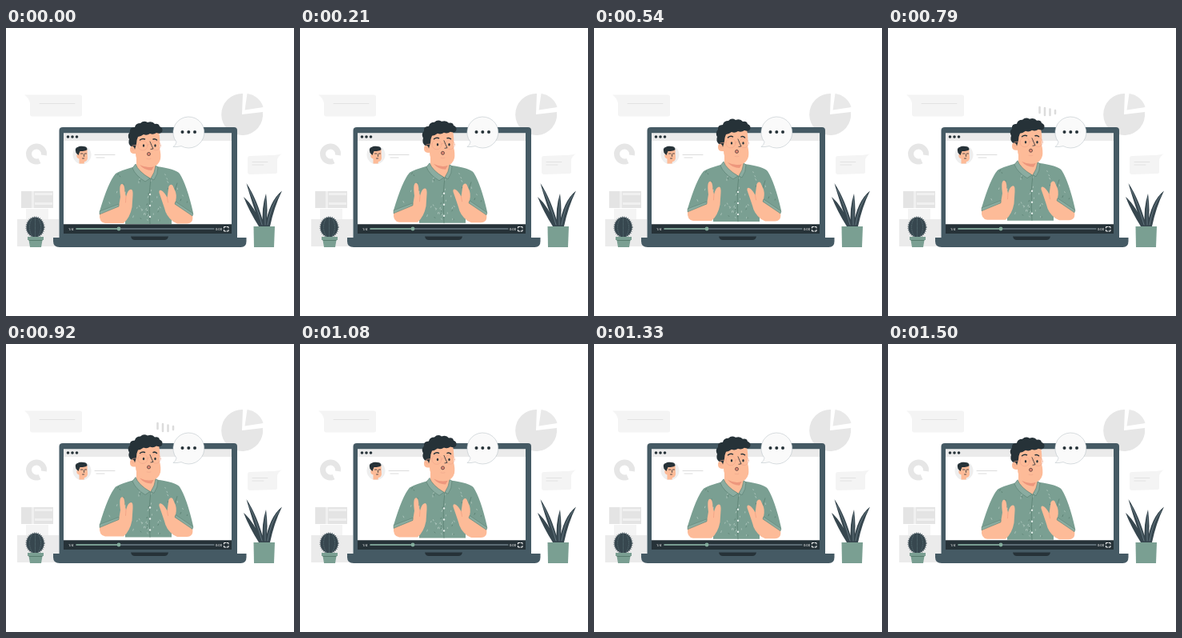
Animation, 360 px wide and 360 px high, one loop 1.54 s. Source, as an HTML page:

```html
<!DOCTYPE html>
<html lang="en">
<head>
<meta charset="utf-8">
<style>
  html, body { margin: 0; width: 100%; height: 100%; overflow: hidden; background: #fff; }
  svg { display: block; width: 100vw; height: 100vh; }
  text { font: 4.2px Roboto, sans-serif; fill: #fff; }
  .dark { fill: #263238; }
  .slate { fill: #455a64; }
  .green { fill: #7a9f92; }
  .skin { fill: #fdbb98; }
  .line { fill: none; stroke-linecap: round; stroke-linejoin: round; }
</style>
</head>
<body>
<svg viewBox="0 0 360 360">
  <!-- background items -->
  <g fill="#f4f4f4">
    <path d="M23 83.500H92.500q2.500 0 2.500 2.500v22q0 2.500-2.500 2.500H33q-3 0-3-3V94Q29 88 23 83.500z"/>
    <path d="M345 157q-6 4-6 9v14q0 2-2 2l-32 1q-3 0-3-3v-17q0-3 3-3l25-1q10 0 15-2z"/>
    <path d="M25 226h28v13H25z"/>
  </g>
  <path class="line" stroke="#e2e2e2" d="M42 94.500H86M308 167.500h19M308 171h14"/>
  <path fill="#e6e6e6" d="M295 108l1-26a26 26 0 1 0 25 23z"/>
  <path fill="#e9e9e9" d="M298.500 102.500l3-20.500a24 24 0 0 1 20 17z"/>
  <path class="line" style="stroke-linecap:butt" stroke="#e6e6e6" stroke-width="7" d="M42 166.100A9.500 9.500 0 1 1 47.400 159"/>
  <path fill="#e4e4e4" d="M19 204h40v21H19z"/>
  <path fill="#f0f0f0" d="M32 204h3v21h-3zM36 206h22v3H36zM36 218h22v3H36z"/>
  <path fill="#ebebeb" d="M14 239h52v34H14z"/>
  <path id="bars" class="line" stroke="#dcdcdc" stroke-width="2.500" d="M189.500 99v7M196 100v9M202.500 101.500v7.500M209 103v4"/>

  <!-- laptop -->
  <path class="slate" d="M71 124H285q4 0 4 4V263H66.500V128q0-4 4.500-4z"/>
  <path fill="#fff" d="M72 131.500H282V257H72z"/>
  <path fill="#ebebeb" d="M72 131.500H282V141H72z"/>
  <g class="dark"><circle cx="77.500" cy="136" r="1.800"/><circle cx="83" cy="136" r="1.800"/><circle cx="88.500" cy="136" r="1.800"/></g>
  <circle cx="95" cy="158.500" r="11.500" fill="#eeeeee"/>
  <path class="skin" d="M89.500 152H101.500l.5 11q-1 4-4 4l-.5 2.500h-6v-6q-4-1-3-5z"/>
  <path class="dark" d="M87.500 156q-2-6 2-7 3-2 7-1 5 0 5 4-2 2-9 2l-2 5z"/>
  <path class="line" stroke="#263238" stroke-width=".8" d="M93.500 157h2.500M98.500 157h2M97.500 158v2.500M95.500 163h2"/>
  <path class="line" stroke="#dcdcdc" d="M111 158.500h25M113 162h10"/>
  <path class="dark" d="M72 245.200H282V257H72z"/>
  <path class="line" stroke="#90a4ae" stroke-width="1.200" d="M88 251H260"/>
  <path class="line" stroke="#83ad9c" stroke-width="1.400" d="M88 251H141"/>
  <circle cx="141" cy="251" r="2.400" fill="#83ad9c"/>
  <text x="78" y="252.500">1/4</text>
  <text x="262" y="252.500">0:00</text>
  <path class="line" stroke="#fff" stroke-width="1" d="M272.500 250v-1.500h2M276 248.500h2v1.500M278 252.500v1.500h-2M274.500 254h-2v-1.500"/>
  <path class="slate" d="M59 262H300.500v4.500q0 7.500-7 7.500H67q-8 0-8-7.500z"/>
  <path class="dark" d="M156 260.500H203q-1 4.500-5 4.500H161q-4 0-5-4.500z"/>

  <!-- speaker -->
  <g id="man">
    <path class="green" d="M162 173Q143 178 137 182 128 192 117 229L118 235 149 224V245H207V222L232 237 234 231Q226 196 217 182 212 176 188 173z"/>
    <g id="specks" class="line" stroke-width=".8"></g>
    <path class="line" stroke="#587d6f" stroke-width=".7" d="M181 188Q178 210 180 245M145 207l2-12M211 203l3-9"/>
    <g fill="#e4eeea"><circle cx="180" cy="208" r="1.200"/><circle cx="180" cy="222" r="1.200"/><circle cx="180" cy="236" r="1.200"/></g>
    <path class="skin" d="M163 163l24 6v9l-6 10q-12-5-18-14z"/>
    <path fill="#ed977d" d="M167 171q10 5 18 2l-3 5q-9 0-15-7z"/>
    <path fill="#8aaca0" stroke="#587d6f" stroke-width=".6" d="M162 170q3 9 18 18l-6 4q-12-7-16-17zM187 172l3 2q0 9-5 16l-4-2q5-7 6-16z"/>
    <!-- forearms and hands -->
    <path class="skin" d="M117 232L141 223 143 211Q141 196 144.500 195 148 194 148.500 204L150 211Q152 203 155 202 159 200 158.500 209L157.500 224Q155 237 147 244H124Q116 243 117 232z"/>
    <path class="skin" d="M233 234L211 220Q214 212 212 205L208.500 197Q206 194 203.500 198L201.500 212Q198 205 194 203 191 202 191.500 206 195 216 198 225 200 235 209 242L214 244.500H226Q235 244 233 234z"/>
    <path class="line" stroke="#ed977d" stroke-width=".6" d="M150 211l-.5 7M201.500 212l1 6"/>
    <path fill="#8aaca0" stroke="#587d6f" stroke-width=".5" d="M117 229l24-9v3l-24 10zM234 232l-22-15-1 3 22 15z"/>
    <!-- head -->
    <path class="skin" d="M161 130q16-6 30 0 2 9 1 20 2 8 1 14-2 7-8 9-10 2-18-4-5-5-5-12-7 1-7-5 0-6 6-5z"/>
    <path class="dark" d="M156 148q-4-4-2-9-3-5 1-9-1-6 6-6 1-5 7-5 4-4 9-1 6-2 9 2 5-1 6 3 5 2 3 7-2 3-7 1-4 3-8 1-4 3-8 1-4 3-7 3-2 4-2 9l-2 7q-1-5-5-4z"/>
    <path class="line" stroke="#263238" stroke-width="1.500" d="M167.500 140q3-2.500 6-1M184 139q2.500-1 4.500 1"/>
    <g class="dark"><ellipse cx="172" cy="147" rx="1.200" ry="1.700"/><ellipse cx="186.500" cy="147" rx="1.200" ry="1.700"/></g>
    <g class="line" stroke="#eda58c" stroke-width=".6">
      <circle cx="171" cy="147" r="6"/><circle cx="187.500" cy="147" r="5.800"/>
      <path d="M177 146q2-2 4.700 0M165 146l-7 1M156 150q2-1 3 3M176 163.500q3 1 5 0"/>
    </g>
    <path class="line" stroke="#263238" stroke-width=".8" d="M180 142q2 5 4 9l-3 .5"/>
    <ellipse cx="178.500" cy="157.500" rx="2" ry="2" fill="#e58b74" stroke="#4e3a3c" stroke-width=".8"/>
  </g>

  <!-- speech bubble -->
  <path fill="#fafafa" stroke="#b0bac0" stroke-width=".5" d="M213 142.500A19.500 19.500 0 1 1 219 147.600Q214 149 209 148.500 212.500 146 213 142.500z"/>
  <g class="dark"><circle cx="220.500" cy="130" r="2"/><circle cx="228.300" cy="130" r="2"/><circle cx="236" cy="130" r="2"/></g>

  <!-- plants -->
  <ellipse cx="36.500" cy="249" rx="11" ry="12.500" fill="#37474f"/>
  <ellipse class="line" style="stroke-linecap:butt" cx="36.500" cy="249" rx="11.300" ry="12.800" stroke="#37474f" stroke-width="1.500" stroke-dasharray=".7 1.700"/>
  <path class="line" stroke="#60777d" stroke-width=".6" stroke-dasharray="1 1.500" d="M36.500 237v24M33 237q-7 12 0 24M40 237q7 12 0 24"/>
  <path class="green" d="M27 261H47v4H45.500l-1.500 9H30L28.500 265H27z"/>
  <path fill="#587d6f" d="M28.500 265h17l-.2 1H28.700z"/>
  <path fill="#37474f" d="M318 248Q306 214 300.500 194 314 214 323 248zM316 248Q304 229 297 211 311 223 320 248zM321 248Q319 225 325 207 328 228 325 248zM324 248Q329 216 345 203.500 335 224 330 248z"/>
  <path class="line" stroke="#90a4ae" stroke-width=".5" d="M320 246Q313 221 304 202M324 246q-1-18 1-34M327 246q4-24 14-37"/>
  <path class="green" d="M309.500 248H336l-1 26H310z"/>
</svg>
<script>
const LOOP = 1540, RISE = 4.4;
const man = document.getElementById('man');
const bars = document.getElementById('bars');
const specks = document.getElementById('specks');

let seed = 11;
const random = () => (seed = seed * 16807 % 2147483647) / 2147483647;

for (let i = 0; i < 56; i++) {
  const y = 182 + random() * 58;
  const half = y < 220 ? 38 + (y - 182) * 0.35 : 25;
  const x = 177 + (random() * 2 - 1) * half;
  const dash = document.createElementNS('http://www.w3.org/2000/svg', 'path');
  dash.setAttribute('d', `M${x} ${y}l${random() * 2 - 1} ${1 + random()}`);
  dash.setAttribute('stroke', i % 3 ? '#b4cbc2' : '#587d6f');
  specks.append(dash);
}

function draw() {
  const t = performance.now() % LOOP;
  // Constant speed up, then down.
  const lift = RISE * (1 - Math.abs(2 * t / LOOP - 1));
  man.setAttribute('transform', `translate(0 ${-lift})`);
  bars.style.opacity = t >= 580 && t < 1080 ? 1 : 0;
  requestAnimationFrame(draw);
}
draw();
</script>
</body>
</html>
```
